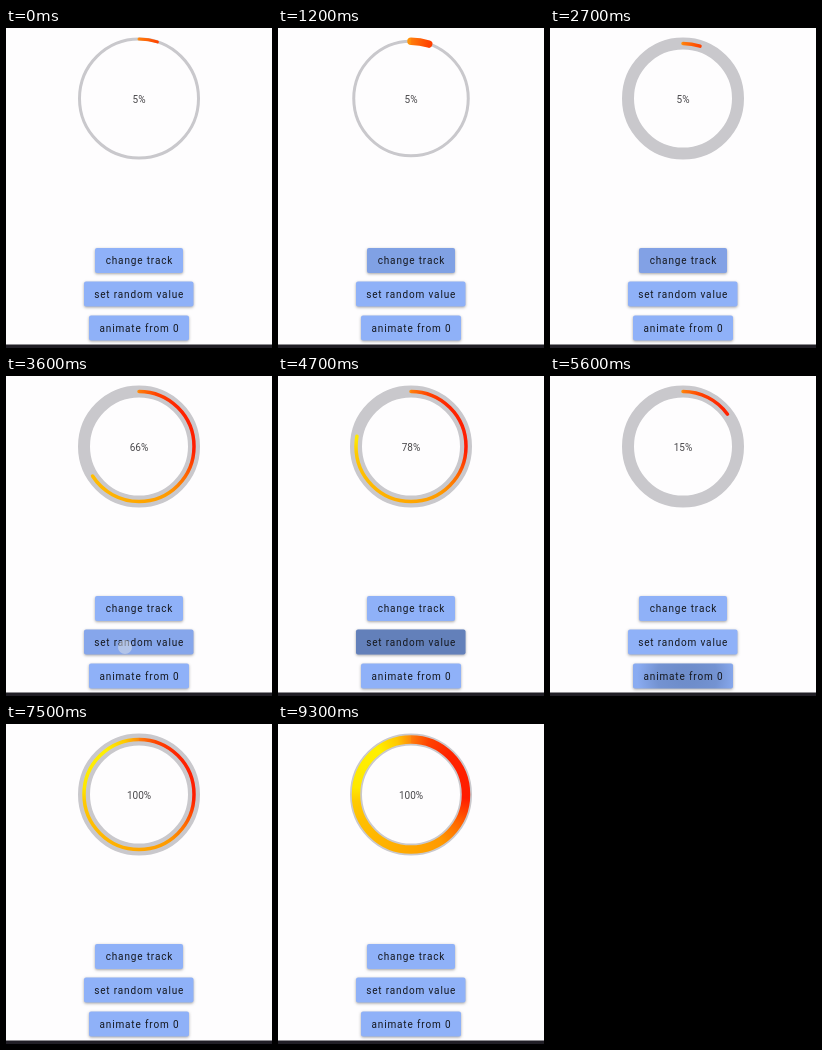
An HTML page with a canvas that plays this animation: 266 px wide and 320 px high, repeating every 9.4 s.

```html
<!DOCTYPE html>
<html lang="en">
<head>
<meta charset="utf-8">
<title>Circular progress</title>
<style>
  html, body { margin: 0; width: 100%; height: 100%; overflow: hidden; background: #fefdfe; }
  canvas { display: block; width: 266px; height: 320px; }
</style>
</head>
<body>
<canvas id="stage" width="266" height="320"></canvas>
<script>
const ctx = document.getElementById('stage').getContext('2d');
const LOOP = 9400, STEP = 100, TAU = Math.PI * 2;
const CX = 133, CY = 70.5, OUTER = 61;
const FONT = 'Roboto, Arial, sans-serif';

const buttons = [
  { label: 'change track', x: 89, y: 220, w: 88 },
  { label: 'set random value', x: 78, y: 253.5, w: 109.5 },
  { label: 'animate from 0', x: 83, y: 287.5, w: 100 }
];

const taps = [
  { button: 0, start: 700, rise: 250, end: 1650, x: 125, y: 235, peak: 0.16 },
  { button: 0, start: 1850, rise: 250, end: 3300, x: 125, y: 235, peak: 0.19 },
  { button: 1, start: 3450, rise: 450, end: 4400, x: 119, y: 271, peak: 0.2 },
  { button: 1, start: 4350, rise: 300, end: 5400, x: 121, y: 268, peak: 0.33 },
  { button: 2, start: 5350, rise: 200, end: 6400, x: 137, y: 300, peak: 0.24, soft: true },
  { button: 0, start: 8350, rise: 250, end: 9250, x: 125, y: 235, peak: 0.16 }
];

// [time, track width, progress width]
const styles = [[0, 3, 3], [900, 3, 7.5], [2100, 12, 3.5], [8700, 12, 8.5]];
const values = [[0, 5], [3550, 66], [4650, 78], [5050, 90]];
const SWEEP_START = 5440, SWEEP_TIME = 2000;

const sweep = ctx.createConicGradient(-Math.PI / 2, CX, CY);
[[0, '#ff7d0c'], [0.05, '#ff4300'], [0.12, '#ff2400'], [0.26, '#ff1c00'],
 [0.34, '#ff6a00'], [0.41, '#ff9a00'], [0.55, '#ffae00'], [0.68, '#ffc000'],
 [0.73, '#ffca00'], [0.77, '#ffe800'], [0.9, '#fff000'], [0.96, '#ffc800'],
 [1, '#ff8a0c']].forEach(([at, color]) => sweep.addColorStop(at, color));

const latest = (list, t) => list.filter(item => item[0] <= t).pop();

function progressAt(t) {
  if (t < SWEEP_START) return latest(values, t)[1];
  const k = Math.min(1, (t - SWEEP_START) / SWEEP_TIME);
  return 100 * (1 - (1 - k) ** 2);
}

function arc(radius, width, color, part) {
  ctx.beginPath();
  ctx.arc(CX, CY, radius, -Math.PI / 2, -Math.PI / 2 + TAU * part);
  ctx.lineWidth = width;
  ctx.strokeStyle = color;
  ctx.lineCap = part < 1 ? 'round' : 'butt';
  ctx.stroke();
}

function text(label, x, y, color, spacing) {
  ctx.font = '10px ' + FONT;
  ctx.letterSpacing = spacing + 'px';
  ctx.textAlign = 'center';
  ctx.textBaseline = 'alphabetic';
  ctx.fillStyle = color;
  ctx.fillText(label, x + spacing / 2, y);
}

function drawRing(t) {
  const [, track, bar] = latest(styles, t);
  const radius = OUTER - Math.max(track, bar) / 2;
  const value = Math.round(progressAt(t));
  arc(radius, track, '#c9c8cc', 1);
  arc(radius, bar, sweep, value / 100);
  text(value + '%', CX, 74.5, '#4a494c', 0);
}

function strength(tap, t) {
  const age = t - tap.start;
  if (age < 0 || t > tap.end) return 0;
  if (age < tap.rise) return tap.peak * age / tap.rise;
  return tap.peak * (tap.end - t) / (tap.end - tap.start - tap.rise);
}

function rippleFill(tap, alpha) {
  const shade = a => `rgba(0, 20, 50, ${a})`;
  if (!tap.soft) return shade(alpha);
  const fill = ctx.createRadialGradient(tap.x, tap.y, 10, tap.x, tap.y, 50);
  fill.addColorStop(0, shade(alpha));
  fill.addColorStop(0.5, shade(alpha * 0.85));
  fill.addColorStop(1, shade(alpha * 0.15));
  return fill;
}

function drawButton(button, index, t) {
  const { x, y, w, label } = button;
  ctx.beginPath();
  ctx.roundRect(x, y, w, 25, 2);
  ctx.save();
  ctx.shadowColor = 'rgba(0, 0, 0, 0.35)';
  ctx.shadowBlur = 3;
  ctx.shadowOffsetY = 1;
  ctx.fillStyle = '#8fb1f8';
  ctx.fill();
  ctx.restore();
  for (const tap of taps) {
    const alpha = strength(tap, t);
    if (tap.button !== index || !alpha) continue;
    ctx.fillStyle = rippleFill(tap, alpha);
    ctx.fill();
  }
  text(label, x + w / 2, y + 16.3, '#15181f', 0.85);
}

function drawTouch(tap, t) {
  const age = t - tap.start;
  if (age < 0 || age > 200) return;
  ctx.beginPath();
  ctx.arc(tap.x, tap.y, 7, 0, TAU);
  ctx.fillStyle = 'rgba(215, 220, 232, 0.55)';
  ctx.fill();
}

function draw(t) {
  ctx.fillStyle = '#fefdfe';
  ctx.fillRect(0, 0, 266, 320);
  drawRing(t);
  buttons.forEach((button, i) => drawButton(button, i, t));
  taps.forEach(tap => drawTouch(tap, t));
  ctx.fillStyle = '#211f26';
  ctx.fillRect(0, 316.5, 266, 3.5);
}

const began = performance.now();
function tick() {
  const t = (performance.now() - began) % LOOP;
  draw(Math.floor(t / STEP) * STEP);
  requestAnimationFrame(tick);
}
tick();
</script>
</body>
</html>
```
